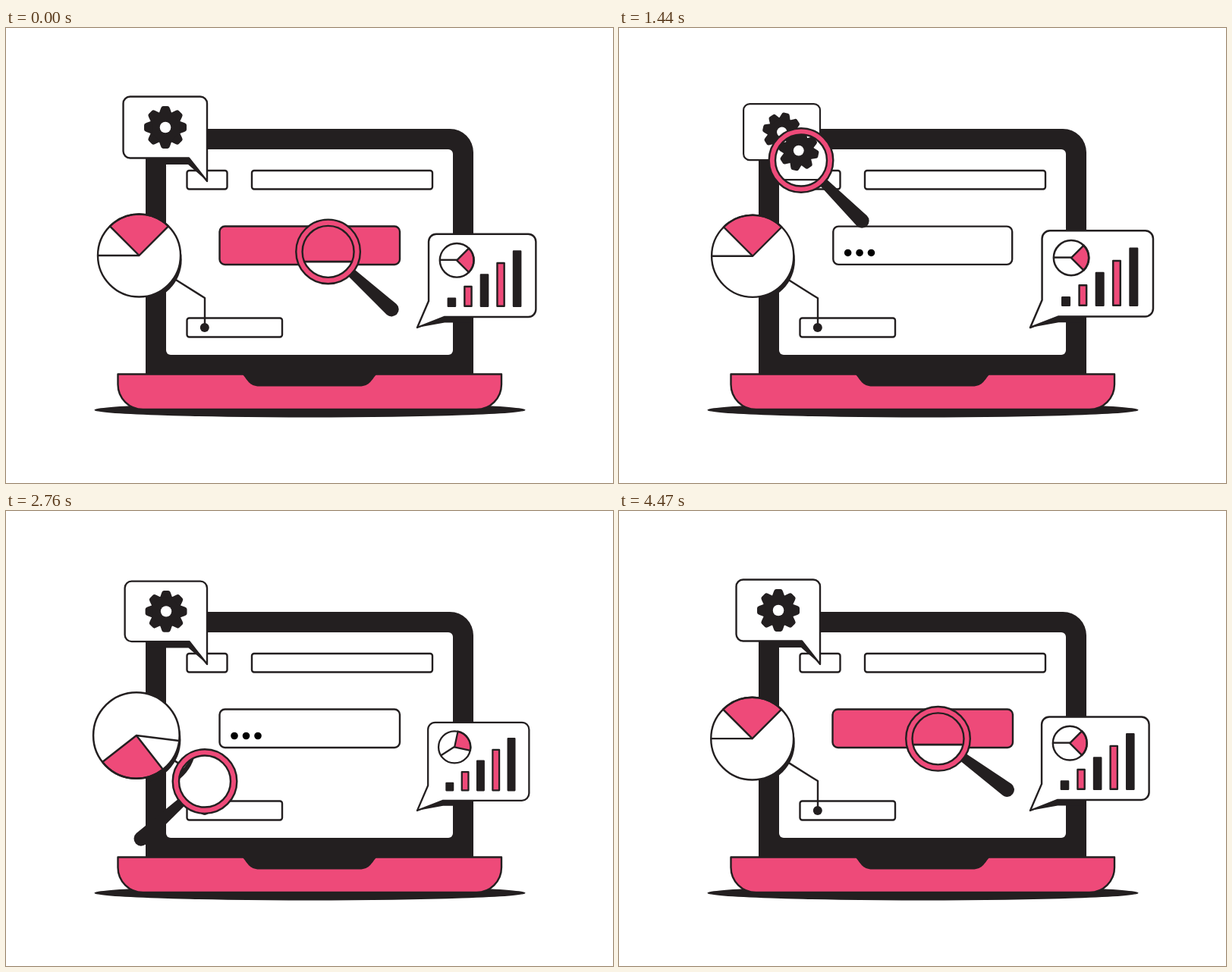
An HTML page that plays this animation: 800 px wide and 600 px high, repeating every 4500 ms.

```html
<!DOCTYPE html>
<html lang="en">
<head>
<meta charset="utf-8">
<title>Laptop search</title>
<style>
  html, body { margin: 0; width: 100%; height: 100%; overflow: hidden; background: #fff; }
  svg { display: block; width: 100%; height: 100%; }
  .line { fill: none; stroke: #231f20; stroke-width: 2.4; stroke-linejoin: round; }
  .white { fill: #fff; }
  .pink { fill: #ee4a79; }
  .dark { fill: #231f20; }
</style>
</head>
<body>
<svg viewBox="0 0 800 600">
  <defs>
    <path id="lid" d="M184 457V164a31 31 0 0 1 31-31H585a31 31 0 0 1 31 31V457Z"/>
    <rect id="field" x="281.5" y="261.5" width="237.5" height="50.5" rx="7"/>
    <clipPath id="lidClip"><use href="#lid"/></clipPath>
    <clipPath id="lensClip"><circle id="lensHole" r="34"/></clipPath>
    <path id="tooth" d="M-8.5-18L-6-25Q-5.2-28-3-28H3Q5.2-28 6-25L8.5-18Z"/>
  </defs>

  <!-- laptop -->
  <ellipse class="dark" cx="400.5" cy="503.7" rx="284" ry="9.7"/>
  <use href="#lid" class="dark"/>
  <rect class="white" x="211" y="160" width="378" height="271" rx="6"/>
  <path class="line pink" d="M147.5 456.5H653V470a33 33 0 0 1-33 33H180.5a33 33 0 0 1-33-33Z"/>
  <path class="dark" d="M311 456C318 463 320 472.5 334 472.5H466C480 472.5 482 463 489 456Z"/>

  <!-- screen fields -->
  <g class="line">
    <rect x="238.5" y="188" width="53" height="24.5" rx="3"/>
    <rect x="324" y="188" width="238" height="24.5" rx="3"/>
    <rect x="238.5" y="382.5" width="125.5" height="25" rx="3"/>
  </g>
  <g id="search">
    <g id="searchBody">
      <use href="#field" class="white"/>
      <use href="#field" class="pink" id="tint"/>
      <use href="#field" class="line"/>
      <g id="dots">
        <circle cx="301" cy="296.5" r="4.8"/>
        <circle cx="316.5" cy="296.5" r="4.8"/>
        <circle cx="332" cy="296.5" r="4.8"/>
      </g>
    </g>
  </g>

  <!-- shadows fall on the laptop only -->
  <g class="dark" clip-path="url(#lidClip)">
    <path class="gearScale" d="M154 165V180H240L265 202L241 165Z"/>
    <path class="chartScale" d="M542 395L578 388.5H698V372H578Z"/>
    <circle class="pieScale" cx="177" cy="305.5" r="54.7"/>
  </g>

  <!-- pie with leader line -->
  <g class="pieScale">
    <path class="line" d="M262 395V356L223 331.5"/>
    <g id="pie">
      <circle class="white" cx="175.5" cy="300" r="54.5"/>
      <g class="pieTurn">
        <path class="line pink" d="M175.5 300L136.96 261.46A54.5 54.5 0 0 1 214.04 261.46Z"/>
        <path class="line" d="M121 300H175.5"/>
      </g>
      <circle class="line" cx="175.5" cy="300" r="54.5"/>
    </g>
  </g>
  <circle class="dark" cx="261.8" cy="395" r="6"/>

  <!-- gear bubble -->
  <g id="gear" class="gearScale">
    <path class="line white" d="M163.5 90.5H256a9 9 0 0 1 9 9V202L241 171.5H163.5a9 9 0 0 1-9-9V99.5a9 9 0 0 1 9-9Z"/>
    <g class="gearTurn">
      <g class="dark" id="cog" transform="translate(210 131)"><circle r="21"/></g>
    </g>
    <circle class="white" cx="210" cy="131" r="7.3"/>
  </g>

  <!-- chart bubble -->
  <g id="chart" class="chartScale">
    <path class="line white" d="M567 272H688a10 10 0 0 1 10 10V371a10 10 0 0 1-10 10H578L542 395L557 360V282a10 10 0 0 1 10-10Z"/>
    <g class="chartTurn">
      <path class="line pink" d="M594 306.5L609.9 290.6A22.5 22.5 0 0 1 609.9 322.4Z"/>
      <path class="line" d="M571.5 306H594"/>
    </g>
    <circle class="line" cx="594" cy="306.5" r="22.3"/>
    <g id="bars"></g>
  </g>

  <!-- magnifier -->
  <g class="lens">
    <path id="handle" class="dark" d="M40-6L113-9.5A9.5 9.5 0 0 1 113 9.5L40 6Z"/>
    <circle class="white" r="42"/>
  </g>
  <g clip-path="url(#lensClip)">
    <use href="#search" transform="translate(400 278.5) scale(1.17) translate(-400 -286.75)"/>
    <g transform="translate(20 7)">
      <circle class="dark pieScale" cx="177" cy="305.5" r="54.7"/>
      <use href="#pie" class="pieScale"/>
    </g>
    <use href="#gear" transform="translate(289 229) scale(1.04) translate(-265 -202)"/>
    <use href="#chart" transform="translate(565 424) scale(1.08) translate(-542 -395)"/>
  </g>
  <g class="lens">
    <circle r="38.2" fill="none" stroke="#ee4a79" stroke-width="8.5"/>
    <circle class="line" r="42.3"/>
    <circle class="line" r="34"/>
  </g>
</svg>
<script>
  const LOOP = 4500, BREATH = LOOP / 2;
  const $ = id => document.getElementById(id);
  const move = (sel, value) =>
    document.querySelectorAll(sel).forEach(el => el.setAttribute('transform', value));

  function add(parent, tag, attrs) {
    const el = document.createElementNS('http://www.w3.org/2000/svg', tag);
    for (const key in attrs) el.setAttribute(key, attrs[key]);
    parent.append(el);
  }

  for (let i = 0; i < 8; i++)
    add($('cog'), 'use', { href: '#tooth', transform: `rotate(${i * 45})` });

  for (let i = 0; i < 5; i++) {
    const height = 10.1 + 15.5 * i;
    add($('bars'), 'rect', {
      class: 'line ' + (i % 2 ? 'pink' : 'dark'),
      x: 582.7 + 21.5 * i, y: 366.8 - height, width: 9.2, height
    });
  }

  // Smooth step from 0 to 1 and smooth hump of half-width w
  const ease = (t, from, length) => {
    const u = Math.min(1, Math.max(0, (t - from) / length));
    return u * u * (3 - 2 * u);
  };
  const hump = (t, mid, w) =>
    Math.abs(t - mid) < w ? Math.cos((t - mid) / w * Math.PI / 2) ** 2 : 0;

  // Each part breathes, then shrinks, swells and spins when the lens visits
  const parts = [
    { name: 'gear', pivot: [265, 202], hub: [210, 131], size: 0.9775, crest: 0, visit: 1380, swell: 0.05, spin: 1440 },
    { name: 'pie', pivot: [262, 395], hub: [175.5, 300], size: 1.0053, crest: 650, visit: 1980, swell: 0.1, spin: 2140 },
    { name: 'chart', pivot: [542, 395], hub: [594, 306.5], size: 1.016, crest: 1450, visit: 2700, swell: 0.067, spin: 2760 }
  ];

  const scaleOf = (p, t) =>
    (p.size + 0.0222 * Math.cos((t - p.crest) / BREATH * 2 * Math.PI)) *
    (1 - 0.06 * hump(t, p.visit, 260) + p.swell * hump(t, p.visit + 500, 380));

  const turnOf = (p, t) => 393 * ease(t, p.spin, 1150) - 33 * ease(t, p.spin - 250, 250);

  // Lens stops: time, x, y, handle angle
  const stops = [
    [0, 424.5, 295, 42.3],
    [630, 463, 260.5, 21.5],
    [1440, 240, 174.5, 44.8],
    [1980, 260.5, 181, 82.6],
    [2760, 262, 356.5, 138],
    [3780, 610.5, 381, 49.1],
    [4470, 420.5, 300.5, 36.4]
  ];
  const stopAt = i => {
    const n = stops.length, lap = Math.floor(i / n);
    const [time, ...pose] = stops[i - lap * n];
    return [time + lap * LOOP, ...pose];
  };

  // Closed curve through the stops that never overshoots them
  function glide(t, k) {
    const slope = i => {
      const a = stopAt(i), b = stopAt(i + 1);
      return (b[k] - a[k]) / (b[0] - a[0]);
    };
    const tangent = i => {
      const a = slope(i - 1), b = slope(i);
      return a * b > 0 ? 2 * a * b / (a + b) : 0;
    };
    let i = 0;
    while (t >= stopAt(i + 1)[0]) i++;
    const a = stopAt(i), b = stopAt(i + 1);
    const d = b[0] - a[0], u = (t - a[0]) / d, w = 1 - u;
    return a[k] * (1 + 2 * u) * w * w + b[k] * (1 + 2 * w) * u * u
      + d * u * w * (tangent(i) * w - tangent(i + 1) * u);
  }

  const scaleAt = ([x, y], s) => `translate(${x} ${y}) scale(${s}) translate(${-x} ${-y})`;

  function draw(t) {
    for (const p of parts) {
      move(`.${p.name}Scale`, scaleAt(p.pivot, scaleOf(p, t)));
      move(`.${p.name}Turn`, `rotate(${turnOf(p, t)} ${p.hub})`);
    }

    move('#searchBody', scaleAt([400, 286.75], 1 - 0.02 * hump(t, 1320, 200)));
    $('tint').setAttribute('opacity', 1 - ease(t, 1120, 140) + ease(t, 4130, 130));
    [...$('dots').children].forEach((dot, i) =>
      dot.setAttribute('opacity', t >= 180 + i * 150 && t < 4180 ? 1 : 0));

    const at = `translate(${glide(t, 1)} ${glide(t, 2)})`;
    move('.lens', at);
    move('#lensHole', at);
    move('#handle', `rotate(${glide(t, 3)})`);
  }

  const start = performance.now();
  function frame() {
    draw((performance.now() - start) % LOOP);
    requestAnimationFrame(frame);
  }
  frame();
</script>
</body>
</html>
```
